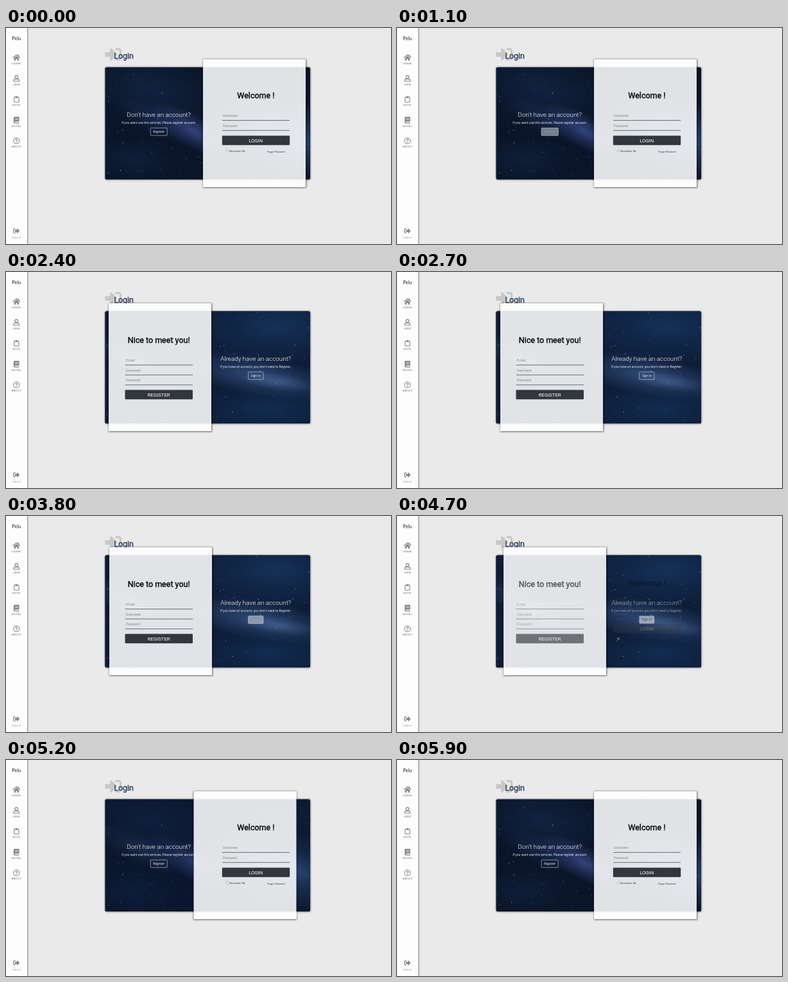
An HTML page for the animation above (6.3 s loop, 600 by 338 pixels).

```html
<!DOCTYPE html>
<html lang="en">
<head>
<meta charset="utf-8">
<title>Login panel</title>
<style>
html, body { margin: 0; width: 100%; height: 100%; overflow: hidden; background: #ebeaeb; }
#stage { position: absolute; left: 0; top: 0; width: 600px; height: 338px; overflow: hidden; }
svg { position: absolute; left: 0; top: 0; display: block; }
#side { position: absolute; left: 0; top: 0; width: 33px; height: 338px; background: #fdfdfd; box-shadow: 0 0 2px 0.8px rgba(60, 65, 75, .65); }
#photo { position: absolute; left: 154.5px; top: 61.5px; width: 319px; height: 175.5px; border-radius: 2px; background: #0b1730; box-shadow: 0 0 3px 0.4px rgba(0, 0, 0, .6); }
#panel { position: absolute; left: 0; top: 48.5px; width: 160px; height: 200.5px; background: rgba(255, 255, 255, .875); box-shadow: 0 0 2.5px 0.5px rgba(0, 0, 0, .6); }
text { font-family: Roboto, sans-serif; }
.mid { text-anchor: middle; }
.brand { font: 7.4px Lato, sans-serif; fill: #222; }
.nav { font: 4.6px Lato, sans-serif; fill: #777; }
.head { font-size: 12.5px; fill: #000; stroke: #000; stroke-width: .35px; }
.ask { font-size: 9.9px; font-weight: 300; fill: #fff; }
.note { font: 4.74px "Open Sans", sans-serif; fill: #fff; }
.field { font-size: 5px; fill: #828488; }
.cta { font-size: 7.7px; fill: #fff; }
.tiny { font: 3.55px "Open Sans", sans-serif; fill: #222; }
.line { stroke: #4a4c50; stroke-width: .8; }
.icon { fill: none; stroke: #858585; stroke-width: 1.1; stroke-linejoin: round; stroke-linecap: round; }
.solid { fill: #858585; stroke: none; }
</style>
</head>
<body>
<div id="stage">
  <div id="side"></div>
  <svg width="600" height="338" viewBox="0 0 600 338">
    <defs>
      <path id="arrow" d="M369 247L201 79c-15-15-41-4.5-41 17v96H24c-13 0-24 11-24 24v96c0 13 11 24 24 24h136v96c0 21 26 32 41 17l168-168c9-9 9-25 0-34z"/>
      <path id="bracket" d="M416 448h-84c-7 0-12-5-12-12v-40c0-7 5-12 12-12h84c18 0 32-14 32-32V160c0-18-14-32-32-32h-84c-7 0-12-5-12-12V76c0-7 5-12 12-12h84c53 0 96 43 96 96v192c0 53-43 96-96 96z"/>
    </defs>
    <text class="brand mid" x="16.3" y="18.6">Pelu</text>

    <g class="icon">
      <path d="M11 46.3L16.3 41.9L21.6 46.3" stroke-width="1.3"/>
      <path class="solid" d="M12.6 46.9L16.3 43.8L20 46.9V51H17.5V48.2H15.1V51H12.6ZM18.7 41.6H20.2V44.6L18.7 43.3Z"/>
      <circle cx="16.3" cy="76.4" r="2.3"/>
      <path d="M12 83.2V82.3Q12 79.9 14.4 79.9H18.2Q20.6 79.9 20.6 82.3V83.2Z"/>
      <rect x="12.7" y="108" width="7.2" height="8" rx=".7"/>
      <path class="solid" d="M14.3 107.5H15.2A1.1 1.1 0 0 1 17.4 107.5H18.3V109.6H14.3Z"/>
      <path class="solid" d="M13.6 139H20.6V146.6H13.9Q13 147.5 13.9 148.1H20.6V149.3H13.6Q11.9 149.3 11.9 147.6V140.7Q11.9 139 13.6 139Z"/>
      <path d="M14.6 141.7H18.7M14.6 143.3H18.7" stroke="#fdfdfd" stroke-width=".7"/>
      <circle cx="16.3" cy="176.4" r="4.6"/>
      <path d="M14.8 175.1Q14.9 173.8 16.3 173.8Q17.8 173.8 17.8 175.1Q17.8 176 16.3 176.8V177.3M16.3 178.9V179"/>
    </g>
    <g transform="translate(11.2 312.3) scale(.0198)" fill="#858585">
      <use href="#arrow" x="128"/>
      <use href="#bracket" transform="translate(512 0) scale(-1 1)"/>
    </g>
    <g class="mid">
      <text class="nav" x="16.2" y="57.2">HOME</text>
      <text class="nav" x="16.2" y="89.6">USER</text>
      <text class="nav" x="16.2" y="122.2">NOTE</text>
      <text class="nav" x="16.2" y="154.6">NOVEL</text>
      <text class="nav" x="16.2" y="187.2">ABOUT</text>
      <text class="nav" x="16.2" y="328.8" style="fill:#999">Logout</text>
    </g>

    <g transform="translate(154.2 28) scale(.0508)" fill="#c9c8c8">
      <use href="#arrow"/><use href="#bracket"/>
    </g>
    <text class="head" x="168.2" y="48.4" style="fill:#2d3f5e;stroke:#2d3f5e">Login</text>
  </svg>

  <div id="photo"></div>
  <svg width="600" height="338" viewBox="0 0 600 338">
    <defs>
      <clipPath id="frame"><rect x="154.5" y="61.5" width="319" height="175.5" rx="2"/></clipPath>
    </defs>
    <g clip-path="url(#frame)"><g id="skyA"></g><g id="skyB"></g></g>
    <g id="askJoin" class="mid">
      <text class="ask" x="238.2" y="139">Don't have an account?</text>
      <text class="note" x="238.2" y="149.8">If you want use this services. Please register account.</text>
    </g>
    <g id="askSign" class="mid">
      <text class="ask" x="389.3" y="139">Already have an account?</text>
      <text class="note" x="389.3" y="149.8">If you have an account, you don't need to Register.</text>
    </g>
    <g id="btnJoin" class="mid">
      <rect x="225.2" y="156.4" width="26" height="11.8" rx="1" stroke="#fff" stroke-opacity=".8" stroke-width=".6" fill="#fff"/>
      <text class="note" x="238.2" y="164.1">Register</text>
    </g>
    <g id="btnSign" class="mid">
      <rect x="377.7" y="156.4" width="23.2" height="11.8" rx="1" stroke="#fff" stroke-opacity=".8" stroke-width=".6" fill="#fff"/>
      <text class="note" x="389.3" y="164.1">Sign in</text>
    </g>
  </svg>

  <div id="panel"></div>
  <svg width="600" height="338" viewBox="0 0 600 338">
    <g id="formSign">
      <text class="head mid" x="389.4" y="110.4">Welcome !</text>
      <text class="field" x="338" y="139.4">Username</text>
      <path class="line" d="M337 144.6H442M337 160.3H442"/>
      <text class="field" x="338" y="155.1">Password</text>
      <rect x="336.8" y="168.4" width="105.4" height="14.8" rx="1.2" fill="#32373d"/>
      <text class="cta mid" x="389.2" y="178.6">LOGIN</text>
      <rect x="343.4" y="190.3" width="3.5" height="3.5" rx=".5" fill="#fff" stroke="#777" stroke-width=".5"/>
      <text class="tiny" x="348.4" y="193.9">Remember Me</text>
      <text class="tiny" x="407" y="194.8">Forgot Password</text>
    </g>
    <g id="formJoin">
      <text class="head mid" x="238.2" y="110.8">Nice to meet you!</text>
      <text class="field" x="187" y="139.8">E-mail</text>
      <text class="field" x="187" y="155.6">Username</text>
      <text class="field" x="187" y="171.2">Password</text>
      <path class="line" d="M185.6 145.6H291M185.6 161.1H291M185.6 176.7H291"/>
      <rect x="185.5" y="184.5" width="105.5" height="14.8" rx="1.2" fill="#32373d"/>
      <text class="cta mid" x="238.2" y="194.7">REGISTER</text>
    </g>
  </svg>
</div>
<script>
const LOOP = 6300, STEP = 100;
const NS = 'http://www.w3.org/2000/svg';
const $ = id => document.getElementById(id);

function add(parent, tag, attrs) {
  const el = document.createElementNS(NS, tag);
  for (const k in attrs) el.setAttribute(k, attrs[k]);
  parent.appendChild(el);
  return el;
}

function random(seed) {
  return () => (seed = (seed * 16807) % 2147483647) / 2147483647;
}

let glowId = 0;
function glow(sky, cx, cy, rx, ry, angle, color, strength) {
  const id = 'glow' + glowId++;
  const grad = add(sky, 'radialGradient', { id });
  add(grad, 'stop', { offset: 0, 'stop-color': color, 'stop-opacity': strength });
  add(grad, 'stop', { offset: .5, 'stop-color': color, 'stop-opacity': strength * .45 });
  add(grad, 'stop', { offset: 1, 'stop-color': color, 'stop-opacity': 0 });
  add(sky, 'ellipse', { cx, cy, rx, ry, fill: `url(#${id})`, transform: `rotate(${angle} ${cx} ${cy})` });
}

function paintSky(sky, base, seed, glows) {
  const rnd = random(seed);
  add(sky, 'rect', { x: 154, y: 61, width: 320, height: 177, fill: base });
  glows.forEach(g => glow(sky, ...g));
  for (let i = 0; i < 650; i++) {
    const size = .3 + .6 * rnd() ** 4;
    add(sky, 'circle', {
      cx: (154 + 320 * rnd()).toFixed(1), cy: (61 + 177 * rnd()).toFixed(1),
      r: size.toFixed(2), fill: '#a9c0e6', opacity: (.1 + .5 * rnd() ** 2).toFixed(2)
    });
  }
}

paintSky($('skyA'), '#0b1529', 71, [
  [225, 95, 110, 60, 10, '#142849', .7],
  [290, 160, 75, 26, 30, '#3b4c8c', .85],
  [235, 145, 70, 24, 25, '#1f3260', .6],
  [200, 205, 70, 35, 0, '#10233f', .7],
  [440, 170, 130, 60, 15, '#2f568c', .85]
]);
paintSky($('skyB'), '#0d1d38', 337, [
  [420, 85, 140, 60, 0, '#17355f', .8],
  [395, 163, 130, 32, 10, '#3a5788', .8],
  [425, 172, 60, 14, 8, '#5876a8', .45],
  [200, 138, 75, 22, 28, '#34496c', .75],
  [410, 215, 120, 40, 0, '#14335c', .7]
]);

// Linear interpolation through [time, value] pairs
function track(t, keys) {
  if (t <= keys[0][0]) return keys[0][1];
  for (let i = 1; i < keys.length; i++) {
    const [t1, v1] = keys[i], [t0, v0] = keys[i - 1];
    if (t <= t1) return v0 + (v1 - v0) * (t - t0) / (t1 - t0);
  }
  return keys[keys.length - 1][1];
}

const panelKeys = [
  [1800, 307], [1900, 303], [2000, 277], [2100, 241], [2300, 175], [2400, 160], [2500, 156.5], [2600, 157], [2700, 161],
  [4600, 161], [4700, 166], [4900, 235], [5000, 264], [5100, 283], [5300, 302], [5400, 310], [5500, 310.5], [5600, 307]
];
const joinFormKeys = [[1800, 0], [2100, 1], [4600, 1], [4800, .3], [4900, 0]];
const signFormKeys = [[1800, 1], [2000, .3], [2100, 0], [4600, 0], [4900, 1]];
const askJoinKeys = [[1800, 1], [2000, .2], [2100, 0], [4600, 0], [4900, 1]];
const askSignKeys = [[1900, 0], [2100, .88], [2200, 1], [4600, 1], [4800, .2], [4900, 0]];
const btnSignKeys = [[2000, 0], [2100, .15], [2300, 1], [4600, 1], [4800, .2], [4900, 0]];
const skyKeys = [[1800, 0], [2100, 1], [4700, 1], [4900, .85], [5400, 0]];
const hoverJoinKeys = [[1000, 0], [1100, .5], [1200, 1], [2200, 1], [2300, 0]];
const hoverSignKeys = [[3700, 0], [3800, .5], [3900, .85], [4000, 1], [4900, 1], [5000, 0]];

function fade(id, opacity) {
  const el = $(id);
  el.style.opacity = opacity;
  el.style.visibility = opacity > 0 ? 'visible' : 'hidden';
}

function hover(id, amount) {
  const [box, label] = $(id).children;
  const c = Math.round(255 - 204 * amount);
  box.setAttribute('fill-opacity', .85 * amount);
  label.style.fill = `rgb(${c},${c},${c})`;
}

function draw(time) {
  const t = Math.floor(time % LOOP / STEP) * STEP;
  $('panel').style.transform = `translateX(${track(t, panelKeys)}px)`;
  fade('formJoin', track(t, joinFormKeys));
  fade('formSign', track(t, signFormKeys));
  fade('askJoin', track(t, askJoinKeys));
  fade('btnJoin', track(t, askJoinKeys));
  fade('askSign', track(t, askSignKeys));
  fade('btnSign', track(t, btnSignKeys));
  fade('skyB', track(t, skyKeys));
  hover('btnJoin', track(t, hoverJoinKeys));
  hover('btnSign', track(t, hoverSignKeys));
}

function tick() {
  draw(performance.now());
  requestAnimationFrame(tick);
}
tick();
</script>
</body>
</html>
```
